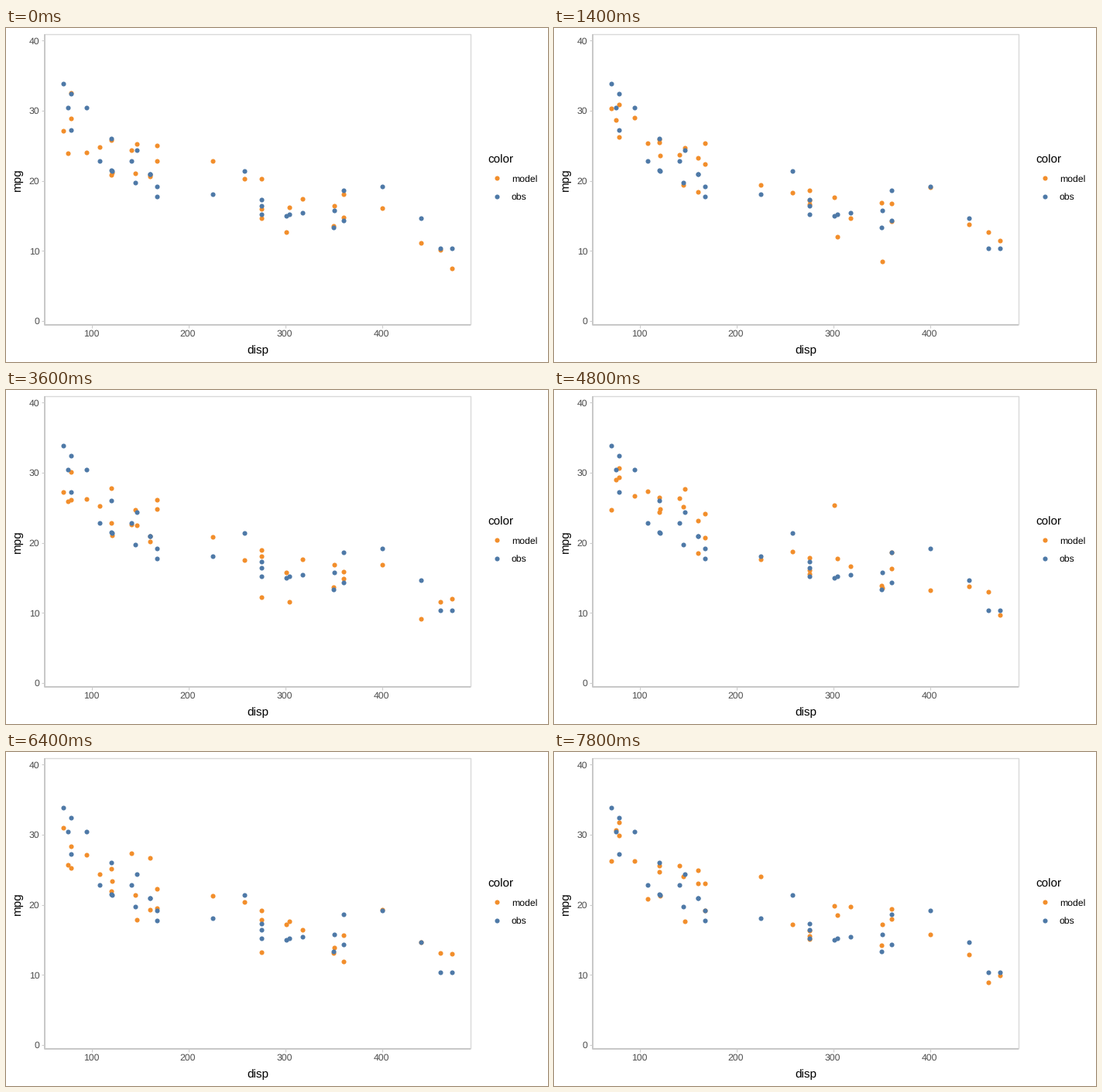
Animation of 700 by 432 pixels, one loop 8000 ms. Source, as a matplotlib script:

```python
import numpy as np
import matplotlib.pyplot as plt
from matplotlib.animation import FuncAnimation

W, H, DPI = 700, 432, 100
FRAMES, STEP = 40, 200
ORANGE, BLUE = "#F28E2B", "#4E79A7"
LEFT, RIGHT, TOP, BOTTOM = 50, 600, 8.2, 383.8
DOT = (6.1 * 72 / DPI) ** 2

plt.rcParams["font.family"] = "Liberation Sans"
plt.rcParams["text.hinting"] = "none"

# mtcars, ordered by displacement
DISP = np.array([
    71.1, 75.7, 78.7, 79, 95.1, 108, 120.1, 120.3, 121, 140.8, 145,
    146.7, 160, 160, 167.6, 167.6, 225, 258, 275.8, 275.8, 275.8, 301,
    304, 318, 350, 351, 360, 360, 400, 440, 460, 472])
MPG = np.array([
    33.9, 30.4, 32.4, 27.3, 30.4, 22.8, 21.5, 26, 21.4, 22.8, 19.7,
    24.4, 21, 21, 19.2, 17.8, 18.1, 21.4, 16.4, 17.3, 15.2, 15,
    15.2, 15.5, 13.3, 15.8, 18.7, 14.3, 19.2, 14.7, 10.4, 10.4])

# Mean of the model and the spread of its draws
KNOTS = [71, 120, 160, 225, 276, 350, 400, 472]
LEVELS = [29.3, 24.6, 21.6, 20.6, 17.4, 15.6, 15.6, 10.6]
MEAN = np.interp(DISP, KNOTS, LEVELS)
SIGMA = 2.4


def px(disp):
    return 74.4 + (disp - 71.1) * 1.2502


def py(mpg):
    return 379 - 9.063 * np.asarray(mpg)


def draw_model(i):
    rng = np.random.default_rng(400 + i)
    return MEAN + rng.normal(0, SIGMA, DISP.size)


fig = plt.figure(figsize=(W / DPI, H / DPI), dpi=DPI, facecolor="white")
ax = fig.add_axes([0, 0, 1, 1])
ax.set(xlim=(0, W), ylim=(H, 0))
ax.axis("off")


def line(xs, ys, color, width):
    ax.plot(xs, ys, color=color, lw=width * 72 / DPI, zorder=1,
            solid_capstyle="butt")


def label(x, y, text, size=8.8, color="#4D4D4D", ha="center", rot=0):
    ax.text(x, y, text, size=size, color=color, ha=ha, va="baseline",
            rotation=rot, rotation_mode="anchor")


def dots(x, y, color, z):
    return ax.scatter(x, y, s=DOT, c=color, linewidths=0, zorder=z)


line([LEFT, RIGHT, RIGHT], [TOP, TOP, BOTTOM], "#D9D9D9", 1.4)
line([LEFT, LEFT, RIGHT], [TOP, BOTTOM, BOTTOM], "#C6C6C6", 1.9)
for v in (100, 200, 300, 400):
    line([px(v)] * 2, [BOTTOM, BOTTOM + 4], "#CCCCCC", 1.1)
    label(px(v) - 0.5, 399.3, str(v))
for v in (0, 10, 20, 30, 40):
    line([LEFT - 4, LEFT], [py(v)] * 2, "#CCCCCC", 1.1)
    label(43.2, py(v) + 4.2, str(v), ha="right")

label(325.2, 421, "disp", 11, "black")
label(18.6, 196, "mpg", 11, "black", rot=90)
label(622.4, 174.4, "color", 11, "black", "left")
for y, name, color in ((194.4, "model", ORANGE), (217.8, "obs", BLUE)):
    dots([634.3], [y], color, 3)
    label(652.8, y + 4.1, name, color="black", ha="left")

model = dots(px(DISP), py(draw_model(0)), ORANGE, 3)
dots(px(DISP), py(MPG), BLUE, 4)


def update(i):
    model.set_offsets(np.column_stack([px(DISP), py(draw_model(i))]))
    return (model,)


anim = FuncAnimation(fig, update, frames=FRAMES, interval=STEP,
                     repeat=True, repeat_delay=0, blit=False)
plt.show()
```
